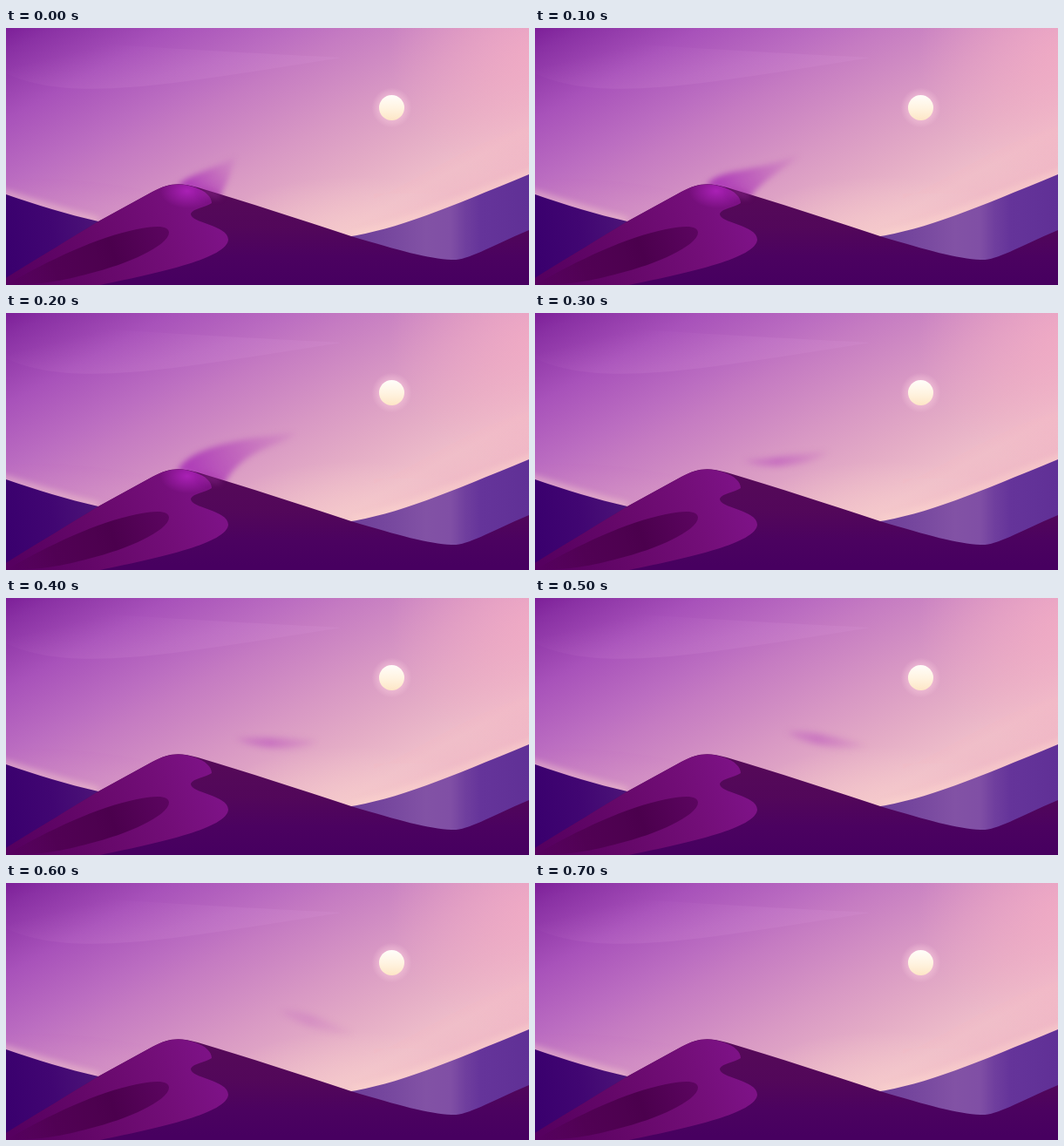
These frames come from a looping animation (600 px wide and 295 px high, 1.4 s). An HTML page with a canvas:

```html
<!DOCTYPE html>
<html lang="en">
<head>
<meta charset="utf-8">
<title>Desert dune</title>
<style>
html, body { margin: 0; width: 100%; height: 100%; overflow: hidden; background: #c77cc2; }
canvas { display: block; width: 600px; height: 295px; }
</style>
</head>
<body>
<canvas id="stage" width="600" height="295"></canvas>
<script>
const W = 600, H = 295, LOOP = 1400, STEP = 100;
const ctx = document.getElementById('stage').getContext('2d');

const skyEdge = new Path2D('M-10 188 C30 201 70 214 106 222 M396 239 C450 229 510 202 610 164');
const leftHill = new Path2D('M0 191 C35 203 70 214 106 222 L130 295 H0 Z');
const rightHill = new Path2D('M390 240 C450 231 505 207 600 168 V295 H390 Z');
const dune = new Path2D('M0 287 C50 256 85 235 106 222 L168 188 C185 179 197 176 220 183 C280 201 335 219 396 239 C450 255 485 265 511 266 C530 267 550 253 600 232 V295 H0 Z');
const face = new Path2D('M0 287 C50 256 85 235 106 222 L168 188 C185 179 198 177 217 183 C229 187 236 194 236 201 C228 206 215 207 212 213 C211 224 255 226 255 243 C253 264 180 280 108 295 H0 Z');
const hollow = new Path2D('M0 295 C50 266 105 240 150 231 C174 226 187 227 187 235 C186 250 140 271 95 282 C65 290 40 295 0 295 Z');

const plumes = [
  'M196 181 C210 168 235 163 264 147 C259 162 255 178 243 197 Z',
  'M196 181 C210 161 250 166 304 145 C288 162 262 172 245 197 Z',
  'M196 181 C213 153 265 145 332 137 C320 154 272 152 250 198 Z'
].map(d => new Path2D(d));

function blend(x0, y0, x1, y1, stops) {
  const g = ctx.createLinearGradient(x0, y0, x1, y1);
  stops.forEach(([p, c]) => g.addColorStop(p, c));
  return g;
}

function fill(path, style) {
  ctx.fillStyle = style;
  ctx.fill(path);
}

function glow(x, y, rx, ry, rgb, alpha, core = 0) {
  ctx.save();
  ctx.translate(x, y);
  ctx.scale(rx, ry);
  const g = ctx.createRadialGradient(0, 0, core, 0, 0, 1);
  g.addColorStop(0, `rgba(${rgb},${alpha})`);
  g.addColorStop(0.5, `rgba(${rgb},${alpha * 0.5})`);
  g.addColorStop(1, `rgba(${rgb},0)`);
  ctx.fillStyle = g;
  ctx.fillRect(-1, -1, 2, 2);
  ctx.restore();
}

function soft(radius, draw) {
  ctx.save();
  ctx.filter = `blur(${radius}px)`;
  draw();
  ctx.restore();
}

function drawSky() {
  ctx.fillStyle = blend(0, 0, 204, 375, [
    [0, '#7c1f98'], [0.06, '#8a31a4'], [0.215, '#a852ba'], [0.37, '#bb6dc1'],
    [0.45, '#c57bc2'], [0.64, '#d898c4'], [0.78, '#e4acc6'], [0.91, '#efbfca'], [1, '#f0b9c6']
  ]);
  ctx.fillRect(0, 0, W, H);
  glow(610, 30, 170, 150, '245,172,196', 0.75);
  glow(400, 245, 170, 75, '248,206,204', 0.7);

  // Thin cloud veils
  fill(new Path2D('M0 52 C45 73 105 74 200 62 C270 53 325 43 385 34 C270 28 100 20 0 8 Z'),
    blend(100, 22, 112, 71, [[0, 'rgba(225,160,225,0)'], [1, 'rgba(225,160,225,.13)']]));
  fill(new Path2D('M0 174 C45 170 95 174 160 186 L110 222 L0 192 Z'),
    blend(0, 172, 0, 205, [[0, 'rgba(190,105,190,.13)'], [1, 'rgba(225,160,205,.1)']]));
  fill(new Path2D('M422 196 C470 177 525 135 600 113 V190 H422 Z'),
    blend(500, 140, 530, 195, [[0, 'rgba(246,180,190,.22)'], [1, 'rgba(246,190,195,0)']]));

  soft(4, () => {
    ctx.strokeStyle = 'rgba(255,220,208,.65)';
    ctx.lineWidth = 6;
    ctx.stroke(skyEdge);
  });
}

function drawSun() {
  glow(442.5, 91.5, 23, 23, '250,205,222', 0.65, 0.5);
  const disc = new Path2D();
  disc.arc(442.5, 91.5, 14.5, 0, Math.PI * 2);
  fill(disc, blend(0, 77, 0, 106, [[0, '#fffdfa'], [0.5, '#fff4e2'], [1, '#fde6c6']]));
}

function drawHills() {
  fill(leftHill, blend(0, 240, 106, 225, [[0, '#3a006e'], [0.5, '#410672'], [1, '#4c1478']]));
  fill(rightHill, blend(396, 0, 600, 0, [
    [0, '#6c3d98'], [0.2, '#76479e'], [0.42, '#8252a5'], [0.56, '#804fa5'],
    [0.64, '#703f9e'], [0.73, '#65349a'], [1, '#603096']
  ]));
}

function drawDune() {
  fill(dune, blend(0, 180, 0, 290, [[0, '#560a58'], [0.45, '#52075a'], [0.75, '#4b0260'], [1, '#470060']]));
  fill(face, blend(10, 285, 235, 205, [[0, '#560060'], [0.4, '#66086a'], [0.75, '#730e78'], [1, '#7d1286']]));
  fill(hollow, blend(0, 295, 187, 232, [[0, 'rgba(76,0,78,0)'], [0.3, 'rgba(76,0,78,.75)'], [0.65, '#4b004d'], [1, '#5c0560']]));
}

function drawPlume(i) {
  const tipX = [262, 300, 328][i], tipY = [150, 147, 138][i];
  soft(3.2, () => fill(plumes[i], blend(218, 188, tipX, tipY, [
    [0, 'rgba(170,52,182,.88)'], [0.45, 'rgba(184,82,186,.7)'], [1, 'rgba(195,105,190,.22)']
  ])));
}

function drawSheen() {
  ctx.save();
  ctx.clip(face);
  glow(208, 187, 31, 20, '172,34,184', 0.95);
  ctx.restore();
  soft(3, () => {
    ctx.fillStyle = 'rgba(160,48,160,.35)';
    ctx.beginPath();
    ctx.ellipse(235, 190, 13, 5, 0.3, 0, Math.PI * 2);
    ctx.fill();
  });
}

// The loose cloud drifts right, shrinks and fades.
function drawCloud(k) {
  const x = 288 + 23 * k, y = 168 - 2.6 * k;
  const w = 49 - 1.5 * k, h = 12 - 0.5 * k;
  const alpha = [0.62, 0.58, 0.52, 0.24][k];
  ctx.save();
  ctx.translate(x, y);
  ctx.rotate(-0.08 + 0.11 * k);
  const body = new Path2D(`M${-w} ${-h * 0.25} C${-w * 0.6} ${-h * (0.1 + 0.35 * k)} ${w * 0.3} ${-h * 0.5} ${w} ${-h * 0.4 + 2 * k} C${w * 0.6} ${h * 0.9} ${-w * 0.6} ${h * 0.9} ${-w} ${-h * 0.25} Z`);
  soft(3.5, () => fill(body, blend(-w, 0, w, 0, [
    [0, `rgba(186,82,188,${alpha * 0.5})`], [0.4, `rgba(186,82,188,${alpha})`], [1, `rgba(200,110,190,${alpha * 0.35})`]
  ])));
  ctx.restore();
}

function draw(now) {
  const step = Math.floor((now % LOOP) / STEP);
  ctx.clearRect(0, 0, W, H);
  drawSky();
  drawSun();
  drawHills();
  if (step < 3) drawPlume(step);
  else if (step < 7) drawCloud(step - 3);
  drawDune();
  if (step < 3) drawSheen();
}

const start = performance.now();
function tick() {
  draw(performance.now() - start);
  requestAnimationFrame(tick);
}
tick();
</script>
</body>
</html>
```
